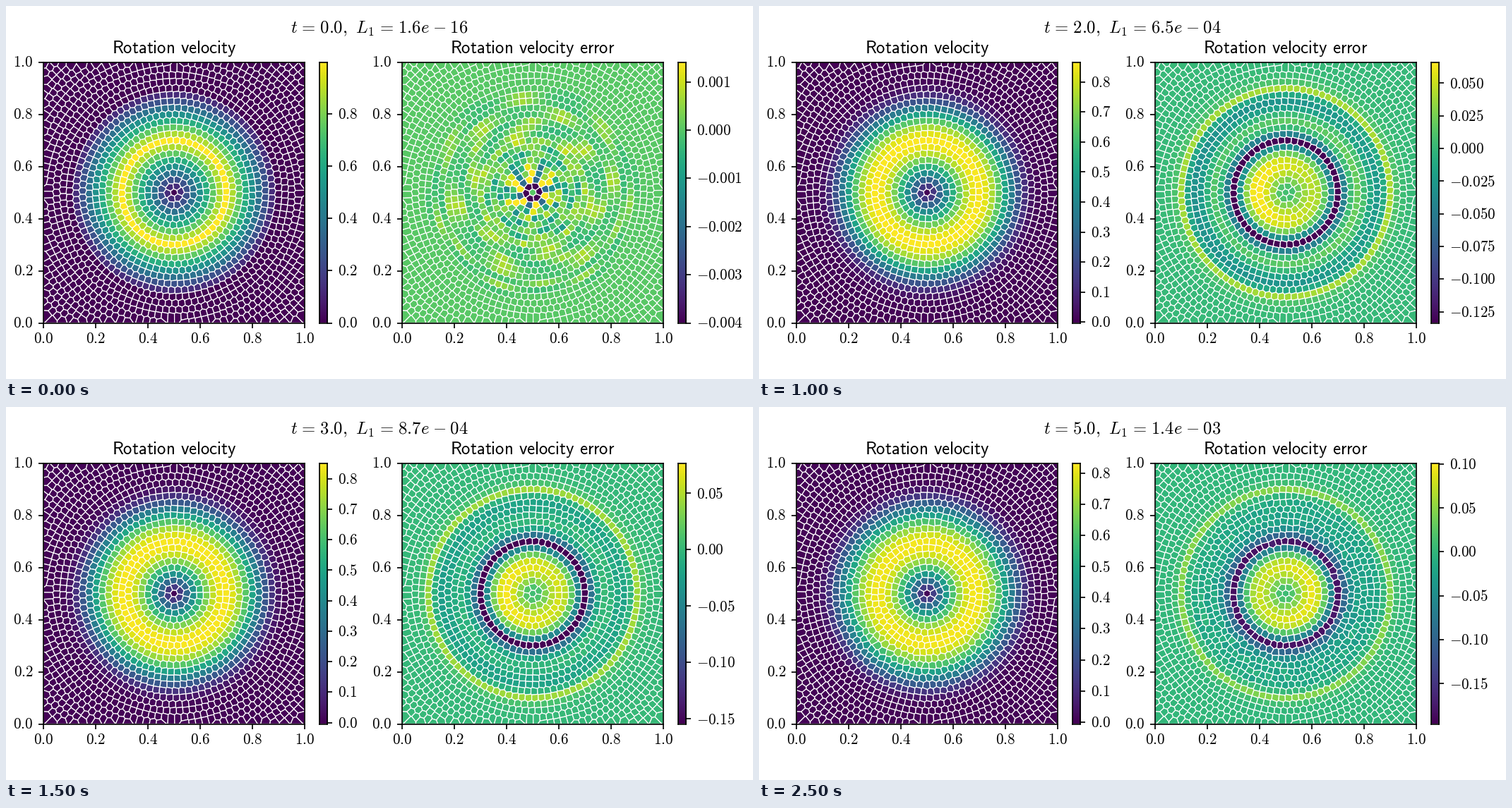
A matplotlib script for the animation above (3 s loop, 1058 px wide and 529 px high).

```python
import math
import numpy as np
import matplotlib.pyplot as plt
from matplotlib.animation import FuncAnimation
from matplotlib.collections import PolyCollection
from matplotlib.ticker import MaxNLocator
from matplotlib.tri import Triangulation

W, H, DPI = 1058, 529, 128
PX = 72 / DPI  # points per pixel
DR = 0.025     # ring spacing of the mesh
NORM_L1 = ["1.6e-16", "3.9e-04", "6.5e-04", "8.7e-04", "1.1e-03", "1.4e-03"]

plt.rcParams.update({
    "font.family": "Liberation Serif",
    "mathtext.fontset": "cm",
    "axes.linewidth": 1.7 * PX,
})

# polar mesh: evenly filled rings, each turned by a random phase
rng = np.random.default_rng(11)
ring, angle = np.array([0]), np.array([0.0])
for n in range(1, 29):
    count = int(2 * np.pi * n)
    ring = np.append(ring, np.full(count, n))
    angle = np.append(angle, 2 * np.pi * (np.arange(count) + rng.random()) / count)
half = ring * DR * np.maximum(abs(np.cos(angle)), abs(np.sin(angle)))
ring, angle = ring[half < 0.499], angle[half < 0.499]
shake = rng.normal(size=(2, ring.size))
erf = np.vectorize(math.erf)


def vortex(r):
    return np.where(r < 0.2, 5 * r, np.clip(2 - 5 * r, 0, None))


def bell(r, mid, width):
    return np.exp(-0.5 * ((r - mid) / width)**2)


def ramp(d, s):
    """max(d, 0) smoothed by a Gaussian of width s."""
    s = max(s, 1e-9)
    z = d / s
    return s * (np.exp(-z * z / 2) / math.sqrt(2 * np.pi)
                + z * (1 + erf(z / math.sqrt(2))) / 2)


def profile(r, t):
    """Vortex with its kinks worn down, a faster core and a fading wave."""
    v = 5 * r - 10 * ramp(r - 0.2, 0.029 * t**(1 / 3)) + 5 * ramp(r - 0.4, 0.02 * t**0.2)
    wave = 0.11 * t * math.exp(-t) * np.sin(10 * np.pi * (0.31 - r))
    return (v + 0.04 * math.sqrt(t) * bell(r, 0.11, 0.05)
            + (wave - 0.0035 * t) * bell(r, 0.31, 0.07))


def voronoi(x, y):
    """Cells of the sites, bounded by the unit square through mirror images."""
    n = x.size
    px = np.concatenate([x, -x, 2 - x, x, x])
    py = np.concatenate([y, y, y, -y, 2 - y])
    tri = Triangulation(px, py).triangles
    ax, ay = px[tri[:, 0]], py[tri[:, 0]]
    bx, by = px[tri[:, 1]] - ax, py[tri[:, 1]] - ay
    cx, cy = px[tri[:, 2]] - ax, py[tri[:, 2]] - ay
    d = 2 * (bx * cy - by * cx)
    ok = abs(d) > 1e-12
    d = np.where(ok, d, 1)
    b2, c2 = bx**2 + by**2, cx**2 + cy**2
    centre = np.column_stack([ax + (cy * b2 - by * c2) / d,
                              ay + (bx * c2 - cx * b2) / d])
    site = tri[ok].ravel()
    corner = np.repeat(centre[ok], 3, axis=0)
    keep = site < n
    site, corner = site[keep], corner[keep]
    turn = np.arctan2(corner[:, 1] - y[site], corner[:, 0] - x[site])
    order = np.lexsort((turn, site))
    cuts = np.cumsum(np.bincount(site, minlength=n))[:-1]
    return np.split(corner[order], cuts)


def centroid(p):
    q = np.roll(p, -1, axis=0)
    cross = p[:, 0] * q[:, 1] - q[:, 0] * p[:, 1]
    return ((p + q) * cross[:, None]).sum(axis=0) / (3 * cross.sum())


def solve(t):
    """Mesh cells, rotation velocity and its error at time t."""
    r = np.maximum(ring * DR, 1e-9)
    spin = (vortex(r) + profile(r, t)) / 2 / r
    wobble = 0.003 * (t / 5)**2 * bell(r, 0.28, 0.08) * shake
    rad = r + wobble[0]
    theta = angle + spin * t + wobble[1] / r
    cells = voronoi(0.5 + rad * np.cos(theta), 0.5 + rad * np.sin(theta))
    # the early flow leans to the left inside and to the right outside
    lean = (4 - t) / 3 * 0.04 * math.sqrt(t) * np.cos(theta)
    v = profile(rad, t) + lean * (0.15 * bell(rad, 0.31, 0.05)
                                  - 0.3 * bell(rad, 0.11, 0.05))
    mid = np.array([centroid(c - 0.5) for c in cells])
    return cells, v, v - vortex(np.hypot(mid[:, 0], mid[:, 1]))


def speed_limits(t):
    if t == 0:
        return 0, 0.9995
    return -0.0004 - 0.0036 * math.log(t), 0.8912 - 0.0365 * math.log(t)


def error_limits(t):
    if t == 0:
        return -0.004, 0.00141
    return -0.092 - 0.0208 * t, 0.0476 + 0.0082 * t + 0.0005 * t * t


fig = plt.figure(figsize=(W / DPI, H / DPI), dpi=DPI, facecolor="white")
locator = MaxNLocator(nbins=9, steps=[1, 2, 2.5, 5, 10])


def add_axes(x, y, w, h):
    ax = fig.add_axes([x / W, 1 - (y + h) / H, w / W, h / H])
    ax.tick_params(length=7.3 * PX, width=1.7 * PX, pad=7.3 * PX,
                   labelsize=21.1 * PX)
    return ax


class Panel:
    def __init__(self, x, title, limits):
        self.limits = limits
        ax = add_axes(x, 79.5, 370, 370)
        ax.set(xlim=(0, 1), ylim=(0, 1))
        ticks = np.arange(6) / 5
        labels = [f"${v:.1f}$" for v in ticks]
        ax.set_xticks(ticks, labels)
        ax.set_yticks(ticks, labels)
        words = title.replace(" ", r"\hspace{0.38}")
        ax.set_title(rf"$\mathsf{{{words}}}$", fontsize=24.7 * PX, pad=12.5 * PX)
        self.mesh = PolyCollection([], cmap="viridis", edgecolors="white",
                                   linewidths=1.25 * PX)
        ax.add_collection(self.mesh, autolim=False)
        self.bar = add_axes(x + 391, 79.5, 11.2, 370)
        self.bar.imshow(np.linspace(0, 1, 256)[:, None], cmap="viridis",
                        origin="lower", extent=(0, 1, 0, 1), aspect="auto")
        self.bar.set_xticks([])
        self.bar.yaxis.tick_right()

    def show(self, t, cells, values):
        lo, hi = self.limits(t)
        self.mesh.set_verts(cells)
        self.mesh.set_array(values)
        self.mesh.set_clim(lo, hi)
        ticks = np.round(locator.tick_values(lo, hi), 6) + 0.0
        step = ticks[1] - ticks[0]
        digits = next(d for d in range(1, 6) if abs(round(step, d) - step) < 1e-7)
        ticks = ticks[(ticks > lo - 1e-6) & (ticks < hi + 1e-6)]
        self.bar.set_yticks((ticks - lo) / (hi - lo),
                            [f"${v:.{digits}f}$" for v in ticks])
        self.bar.set_ylim(0, 1)


speed = Panel(53, "Rotation velocity", speed_limits)
error = Panel(561, "Rotation velocity error", error_limits)
head = fig.text(0.5, 1 - 38 / H, "", ha="center", va="baseline",
                fontsize=24.7 * PX)
EQ = r"\hspace{0.116}=\hspace{0.116}"
MINUS = r"\hspace{0.053}-\hspace{0.053}"


def update(t):
    cells, v, err = solve(t)
    speed.show(t, cells, v)
    error.show(t, cells, err)
    norm = NORM_L1[t].replace("-", MINUS)
    head.set_text(rf"$t{EQ}{t:.1f},\hspace{{0.38}}L_1{EQ}{norm}$")
    return speed.mesh, error.mesh, head


anim = FuncAnimation(fig, update, frames=6, interval=500, repeat=True,
                     init_func=lambda: update(0), blit=False)
plt.show()
```
